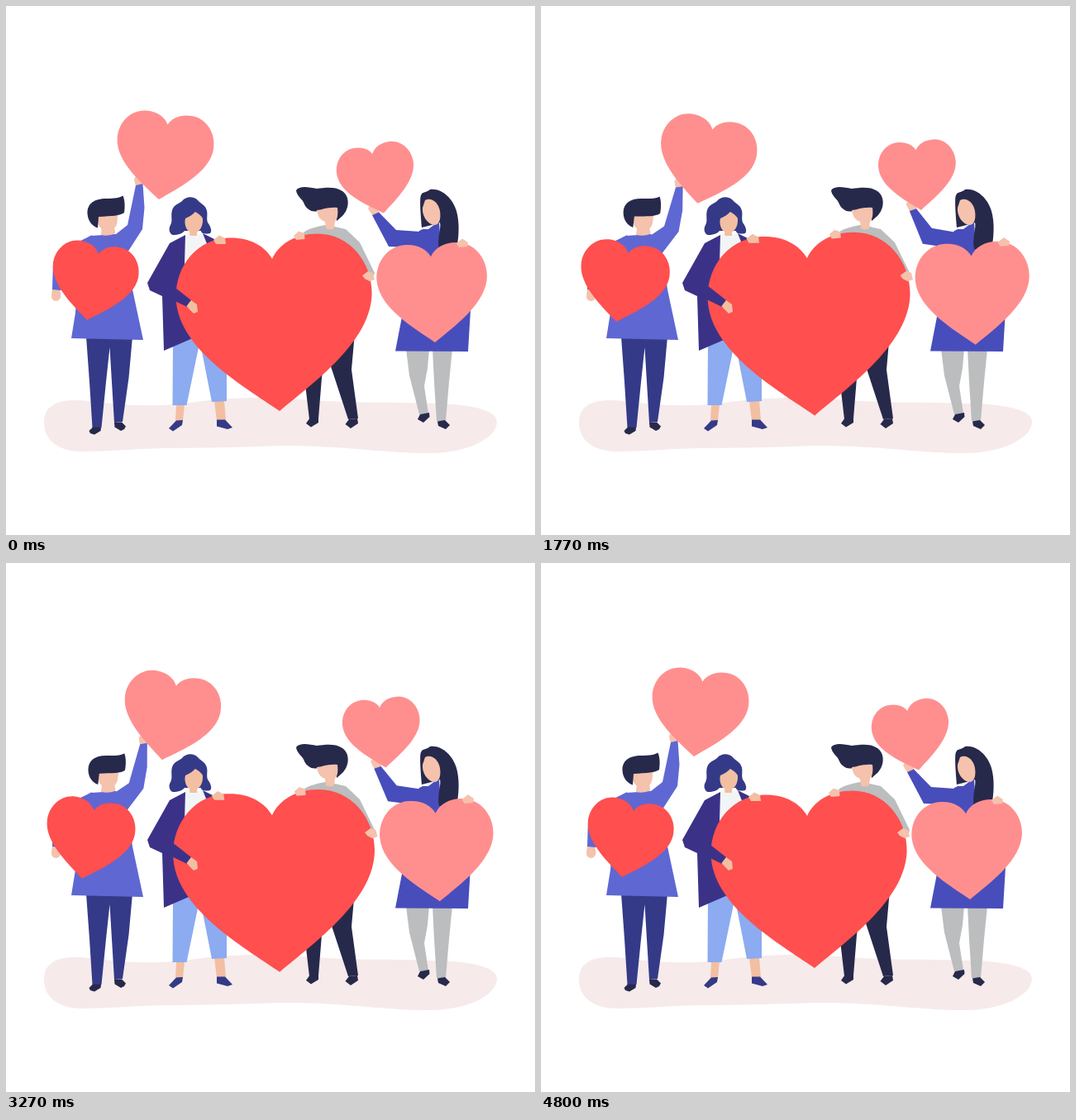
Recreate the animation shown at these times as an HTML page with a canvas. Size 640 by 640 pixels, loop 4830 ms.

```html
<!DOCTYPE html>
<html lang="en">
<head>
<meta charset="utf-8">
<title>People holding hearts</title>
<style>
  html, body { margin: 0; width: 100%; height: 100%; overflow: hidden; background: #fff; }
  canvas { display: block; width: 640px; height: 640px; }
</style>
</head>
<body>
<canvas id="stage"></canvas>
<script>
const LOOP = 4830;
const canvas = document.getElementById('stage');
const ctx = canvas.getContext('2d');
const ratio = window.devicePixelRatio || 1;
canvas.width = canvas.height = 640 * ratio;

const RED = '#ff4f4f', PINK = '#ff8f8f', NAVY = '#27294b', INDIGO = '#343a87';
const SKIN = '#f4c2ad', TAN = '#f2bfa2', GREY = '#bbbdbe', BLUE = '#5f67d3';
const JACKET = '#3b3288', JEANS = '#8cabf0', DRESS = '#484dbc';

const shape = (color, d) => ({ color, path: new Path2D(d) });

// Unit heart: notch at (0, 0), tip at (0, 1).
const unitHeart = new Path2D(
  'M0 0C.048 -.096 .16 -.158 .306 -.151C.512 -.141 .653 .048 .643 .254C.627 .569 .237 .821 0 1' +
  'C-.237 .821 -.627 .569 -.643 .254C-.653 .048 -.512 -.141 -.306 -.151C-.16 -.158 -.048 -.096 0 0Z');

function heart(color, [x, y], [tipX, tipY]) {
  const dx = tipX - x, dy = tipY - y;
  const path = new Path2D();
  path.addPath(unitHeart, new DOMMatrix([dy, -dx, dx, dy, x, y]));
  return { color, path };
}

const draw = parts => {
  for (const { color, path } of parts) {
    ctx.fillStyle = color;
    ctx.fill(path);
  }
};

// Draws parts turned and scaled about (x, y), then shifted by dx.
function drawPosed(parts, { x, y, turn = 0, scale = 1, dx = 0 }) {
  ctx.save();
  ctx.translate(x + dx, y);
  ctx.rotate(turn);
  ctx.scale(scale, scale);
  ctx.translate(-x, -y);
  draw(parts);
  ctx.restore();
}

const ground = [
  shape('#f6eaea', 'M46 504C46 485 60 477 83 477C110 477 150 488 215 481C260 474 310 472 360 476C410 481 470 479 520 481C560 482 594 488 594 503C594 522 560 541 512 541C460 541 400 531 330 532C280 534 230 535 190 535C150 536 120 539 92 539C66 539 46 527 46 504Z')
];

const firstMan = {
  body: [
    shape(INDIGO, 'M97 400L101 455L104.500 510L115.500 510L121 455L125.500 413L128 455L131 504L141 503L148.500 450L153 400Z'),
    shape(NAVY, 'M100.500 514L105 509.500L115 510L114.500 514L107 518.500L102 517Z'),
    shape(NAVY, 'M131 504L140 503.500L145 508.500L143 512L139 514L131.500 509.500Z'),
    shape(SKIN, 'M56 342L65 342L66.500 351Q65 357 60 357Q54.500 356 55 350Z'),
    shape(BLUE, 'M104 277L90 285L57 310L56 343L66 344L90 330Z'),
    shape(BLUE, 'M103 278L133 276L147 298L153 343L166 404L79 402L84 371L90 284Z')
  ],
  arm: [
    shape(SKIN, 'M157 218L155 210Q156 205 160 206L168 208L165 216Z'),
    shape(BLUE, 'M126 277L133 276L147 265L157 217L165.500 215L167.500 244L165 270L147 298L135 310Z')
  ],
  head: [
    shape(SKIN, 'M116 266L131 268L132.500 275Q124 279 115 277Z'),
    shape(SKIN, 'M110 252L135.500 250L134.500 262Q133 270 125 272Q113 272 111 262Z'),
    shape(NAVY, 'M98.500 251C98 239 107 233 121 233C131 233 138 232 141.500 229.500C144 235 144 244 143 250C138 254 128 254 112 255L111 268.500C104 266 99 260 98.500 251Z')
  ],
  upperHeart: [heart(PINK, [195.5, 143.5], [185, 234])],
  heart: [heart(RED, [112, 300], [98, 380])]
};

const firstWoman = {
  body: [
    shape(TAN, 'M206 482L216 482L214 502L205 502Z'),
    shape(TAN, 'M252 478L264 477L266 502L255 502Z'),
    shape(INDIGO, 'M197 511L206 501.500L214 501L213 507L202 514.500Z'),
    shape(INDIGO, 'M255 500.500L265 500.500L274 510L268 512L255 508.500Z'),
    shape(JEANS, 'M202 405L201.500 483L218.500 483L233 413L236 413L249 479L267 478L267 440L230 398Z'),
    shape('#f2f5f6', 'M216 277L222 274Q226 281 232 276L240 275L245 290L216 314Z'),
    shape(JACKET, 'M217 277L198 287L171 335L174 344L189 351L191 417L228 401L236 340L216 312Z'),
    shape(JACKET, 'M238 275L254 283L244 290Z'),
    shape(INDIGO, 'M202 277C198 276 196 270 199 265C202 260 199 254 201 247C203 240 210 239 213 236C218 230 227 230 232 235C235 239 240 240 242 245C245 251 242 256 244 262C247 266 250 272 247 275C243 276 236 276 236 272L216 272C214 275 208 277 202 277Z'),
    shape(TAN, 'M217 257C222 255 226 252 229 249Q235 252 238 257Q238.500 265 235 270L231 274L231 278L222.500 278L222 273C217 270 215.500 262 217 257Z')
  ],
  forearm: [
    shape(JACKET, 'M198 336L205 341L224 356L219 364L190 350Z'),
    shape(TAN, 'M218.500 363L224 356L231 361L232 370L227 372L222 367Z')
  ]
};

const secondMan = [
  shape(NAVY, 'M360 440L367 500L378 499L382 450L385 430L393 436L414 500L426 499L418 440L422 395L380 400Z'),
  shape(NAVY, 'M363 505L368 498L378 499L378 504L369 509.500Z'),
  shape(NAVY, 'M410.500 506L415 500L425 499L426 505L417 511Z'),
  shape(GREY, 'M360 274C366 269 376 267 386 265L398 267L411 270L428 286L446 323L443 331L430 335L400 300L361 285Z'),
  shape(NAVY, 'M351 223C355 217 366 219 376 221C386 220 398 218 407 224C416 230 416 245 407 254L400 260L400 245L377 248C370 250 364 246 361 240C359 233 352 231 351 223Z'),
  shape(SKIN, 'M376 247C382 247 388 243 401 244C402 252 401 258 398 261L397 269Q392 272 387 269L386 261C380 259 377 254 376 247Z')
];

const bigHeart = [
  heart(RED, [322, 306], [331, 490]),
  shape(TAN, 'M251 283L258 277.500L265 281L266 288L254 288Z'),
  shape(SKIN, 'M348 278L354 272.500L361 275L361.500 282L351 283Z'),
  shape(SKIN, 'M431 326L438 321L444 323L446 331L440 333L434 330Z')
];

const secondWoman = {
  body: [
    shape(GREY, 'M484 415L488 447L500 494L511 493L506 460L510 438L512 415Z'),
    shape(GREY, 'M516 415L518 455L521 502L532 502L536 455L540 415Z'),
    shape(NAVY, 'M498 500L501 494L512 492L512.500 497L505 504Z'),
    shape(NAVY, 'M522 502.500L531 501L537 507L532 512L523 508Z'),
    shape(DRESS, 'M500 272L517 264L524 262L526 290L545 290L562 368L559 418L471 417.500L479 376L482 300Z')
  ],
  arm: [
    shape(SKIN, 'M443 253L438 245L441 240L447 241L452 250Z'),
    shape(DRESS, 'M443 253L451 249.500L472 271L501 273L512 293L463 291Z')
  ],
  head: [
    shape('#f2f2fa', 'M503 270L511 266L523 261L511 270Z'),
    shape(NAVY, 'M503 268C502 255 500 234 502 229C504 224 509 226 513 222C528 220 541 234 545 248C549 262 548 280 545 294L524 294C521 282 527 268 525 262L511 266Z'),
    shape(SKIN, 'M507 235C514 231 523 237 525 248C526.500 258 524 265 518 265C510 264 503 254 504 244Z')
  ],
  upperHeart: [heart(PINK, [443.3, 178.9], [457, 250.5])],
  heart: [
    heart(PINK, [514, 303.3], [519, 407]),
    shape(SKIN, 'M545 287L552 281.500L559 286L558 291L548 292Z')
  ]
};

function render(now) {
  const sway = (1 - Math.cos(2 * Math.PI * now / LOOP)) / 2;
  const scale = 1 + 0.04 * sway;
  const manArm = { x: 129, y: 290, turn: 0.1 * sway };
  const womanArm = { x: 494, y: 278, turn: 0.12 * sway };

  ctx.setTransform(ratio, 0, 0, ratio, 0, 0);
  ctx.fillStyle = '#fff';
  ctx.fillRect(0, 0, 640, 640);
  draw(ground);

  draw(firstMan.body);
  drawPosed(firstMan.arm, manArm);
  drawPosed(firstMan.head, { x: 122, y: 276, turn: 0.052 * sway });
  drawPosed(firstMan.upperHeart, manArm);
  drawPosed(firstMan.heart, { x: 108, y: 322, scale, dx: -7.9 * sway });

  draw(firstWoman.body);
  draw(secondMan);
  drawPosed(bigHeart, { x: 325, y: 328, scale });
  draw(firstWoman.forearm);

  draw(secondWoman.body);
  drawPosed(secondWoman.arm, womanArm);
  draw(secondWoman.head);
  drawPosed(secondWoman.upperHeart, womanArm);
  drawPosed(secondWoman.heart, { x: 515, y: 326, scale, dx: 7.9 * sway });
}

const start = performance.now();
function tick() {
  render(performance.now() - start);
  requestAnimationFrame(tick);
}
tick();
</script>
</body>
</html>
```
